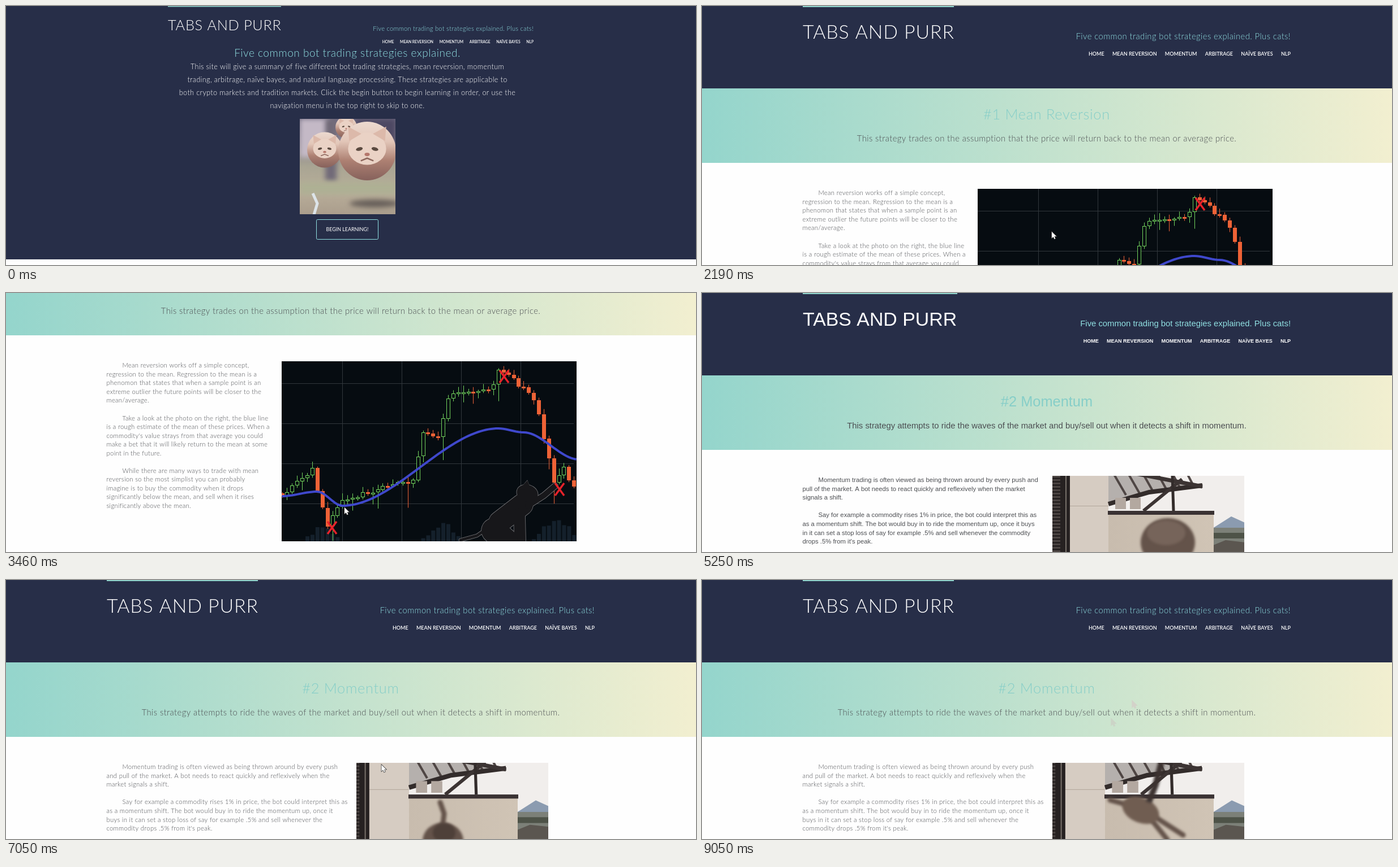
An HTML page with a canvas for the animation above (9.13 s loop, 1219x459 px).

```html
<!DOCTYPE html>
<html lang="en">
<head>
<meta charset="utf-8">
<title>Trading bot strategies</title>
<style>
html, body { margin: 0; width: 100%; height: 100%; overflow: hidden; background: #fff; }
canvas { display: block; }
</style>
</head>
<body>
<canvas id="stage" width="1219" height="459"></canvas>
<script>
const ctx = document.getElementById('stage').getContext('2d');
const W = 1219, H = 459, LOOP = 9130, TAU = Math.PI * 2;
const NAVY = '#272e48', TEAL = '#8fd4cc', AQUA = '#90e0e2', GREY = '#4c4e52';
const NAV = ['HOME', 'MEAN REVERSION', 'MOMENTUM', 'ARBITRAGE', 'NAÏVE BAYES', 'NLP'];
let fallback = false; // true until the web font has loaded

const INTRO = `This site will give a summary of five different bot trading strategies, mean reversion, momentum
trading, arbitrage, naïve bayes, and natural language processing. These strategies are applicable to
both crypto markets and tradition markets. Click the begin button to begin learning in order, or use the
navigation menu in the top right to skip to one.`;

// A leading ">" marks an indented first line.
const REVERSION = `>Mean reversion works off a simple concept,
regression to the mean. Regression to the mean is a
phenomon that states that when a sample point is an
extreme outlier the future points will be closer to the
mean/average.

>Take a look at the photo on the right, the blue line
is a rough estimate of the mean of these prices. When a
commodity's value strays from that average you could
make a bet that it will likely return to the mean at some
point in the future.

>While there are many ways to trade with mean
reversion so the most simplist you can probably
imagine is to buy the commodity when it drops
significantly below the mean, and sell when it rises
significantly above the mean.`;
const MOMENTUM = `>Momentum trading is often viewed as being thrown around by every push
and pull of the market. A bot needs to react quickly and reflexively when the
market signals a shift.

>Say for example a commodity rises 1% in price, the bot could interpret this as
as a momentum shift. The bot would buy in to ride the momentum up, once it
buys in it can set a stop loss of say for example .5% and sell whenever the
commodity drops .5% from it's peak.`;
const MOMENTUM_FALLBACK = `>Momentum trading is often viewed as being thrown around by every push and
pull of the market. A bot needs to react quickly and reflexively when the market
signals a shift.

>Say for example a commodity rises 1% in price, the bot could interpret this as
as a momentum shift. The bot would buy in to ride the momentum up, once it buys
in it can set a stop loss of say for example .5% and sell whenever the commodity
drops .5% from it's peak.`;

const mix = (a, b, p) => a + (b - a) * p;
const progress = (t, from, to) => Math.min(1, Math.max(0, (t - from) / (to - from)));
const smooth = p => p * p * (3 - 2 * p);
const random = n => Math.abs(Math.sin(n * 12.9898 + 4.1) * 43758.5453) % 1;

// Height at x of a curve through [x, y] points.
function along(points, x, ease = p => p) {
  const i = Math.max(1, points.findIndex(p => p[0] >= x));
  const [x0, y0] = points[i - 1], [x1, y1] = points[i];
  return mix(y0, y1, ease((x - x0) / (x1 - x0)));
}

function rect(x, y, w, h, color) {
  ctx.fillStyle = color;
  ctx.fillRect(x, y, w, h);
}
function ellipse(x, y, rx, ry, color, turn = 0) {
  ctx.fillStyle = color;
  ctx.beginPath();
  ctx.ellipse(x, y, rx, ry, turn, 0, TAU);
  ctx.fill();
}
function path(points) {
  ctx.beginPath();
  for (let i = 0; i < points.length; i += 2) ctx.lineTo(points[i], points[i + 1]);
}
function shape(points, color) {
  path(points);
  ctx.fillStyle = color;
  ctx.fill();
}
function line(points, color, width, cap = 'butt') {
  path(points);
  ctx.strokeStyle = color;
  ctx.lineWidth = width;
  ctx.lineCap = cap;
  ctx.stroke();
}
function gradient(x0, y0, x1, y1, ...colors) {
  const g = ctx.createLinearGradient(x0, y0, x1, y1);
  colors.forEach((c, i) => g.addColorStop(i / (colors.length - 1), c));
  return g;
}
function text(str, x, y, size, color, align = 'left', weight = 300) {
  const family = fallback ? '"Liberation Sans", Arial, sans-serif' : 'Lato, "Open Sans", sans-serif';
  ctx.font = `${fallback && weight < 600 ? 400 : weight} ${size}px ${family}`;
  ctx.letterSpacing = fallback || weight > 300 ? '0px' : size * 0.027 + 'px';
  ctx.textAlign = align;
  ctx.fillStyle = color;
  ctx.fillText(str, x, y);
}
// Clips to a box and moves the origin to its corner.
function framed(x, y, w, h, draw) {
  ctx.save();
  ctx.beginPath();
  ctx.rect(x, y, w, h);
  ctx.clip();
  ctx.translate(x, y);
  draw();
  ctx.restore();
}

function header(left, right, k) {
  rect(left, 0, (fallback ? 273 : 267) * k, 2 * k, TEAL);
  text('TABS AND PURR', left, 58 * k, 33.87 * k, '#fff');
  text('Five common trading bot strategies explained. Plus cats!', right, 59 * k, 14.84 * k, AQUA, 'right');
  let x = right;
  for (const item of [...NAV].reverse()) {
    text(item, x, 87.7 * k, 9.03 * k, '#fff', 'right', 600);
    x -= ctx.measureText(item).width + 14.2 * k;
  }
}

function ballCat(x, y, r) {
  ctx.save();
  ctx.translate(x, y);
  ctx.scale(r, r);
  ellipse(0, 0, 1, 1.02, gradient(0, -1, 0, 1, '#ecd9cf', '#e2c6b8', '#ad8072', '#87625c'));
  ellipse(0, -0.08, 0.66, 0.56, '#ead2c5');
  for (const side of [-1, 1]) {
    shape([side * 0.62, -0.35, side * 0.66, -0.85, side * 0.2, -0.6], '#dcb9aa');
    ellipse(side * 0.27, -0.07, 0.12, 0.06, '#5b4a40', side * 0.25);
  }
  ellipse(0, 0.12, 0.09, 0.06, '#b5776c');
  line([-0.22, 0.34, 0, 0.25, 0.22, 0.34], '#8d675d', 0.05);
  ctx.restore();
}

function catsPhoto() {
  rect(0, 0, 170, 170, gradient(0, 0, 0, 170, '#6f6a80', '#8d8692', '#a9a593', '#b9ae9a', '#aa9d8c'));
  ctx.filter = 'blur(4px)';
  rect(0, 0, 52, 68, '#c4b9c6');
  rect(45, 0, 20, 110, '#716a78');
  rect(98, 0, 72, 45, '#4d4863');
  rect(0, 112, 170, 22, '#aeb094');
  ellipse(132, 150, 44, 7, '#675f5a');
  ctx.filter = 'none';
  line([23, 132, 31, 150, 25, 170], '#dde4e8', 5);
  ballCat(82, 15, 19);
  ballCat(44, 55, 31);
  ballCat(119, 57, 51);
}

function homePage(t) {
  rect(0, 0, W, 449, NAVY);
  header(286, 932, 0.7486);
  text('Five common bot trading strategies explained.', 603, 90, 19.05, AQUA, 'center');
  INTRO.split('\n').forEach((s, i) => text(s, 603, 111.5 + 23.3 * i, 12.7, '#fff', 'center'));
  framed(519, 200, 169, 169, catsPhoto);
  ctx.beginPath();
  ctx.roundRect(548.5, 378.5, 109, 35, 2);
  ctx.fillStyle = `rgba(143,212,204,${0.15 * progress(t, 1150, 1350)})`;
  ctx.fill();
  ctx.strokeStyle = AQUA;
  ctx.lineWidth = 1;
  ctx.stroke();
  text('BEGIN LEARNING!', 603, 399, 8.9, '#fff', 'center', 400);
}

// Turning points as [candle, height].
const PRICE = [[0, 238], [6, 193], [9, 290], [12, 246], [26, 210], [28, 124], [31, 136], [33, 62],
  [42, 44], [43, 12], [49, 56], [51, 90], [54, 218], [56, 190], [58, 222]];
const MEAN = [[0, 239], [7, 231], [12, 256], [43, 119], [48, 126], [59, 174]];
const candleX = i => 0.6 + 8.89 * i;

function candle(i) {
  const x = Math.round(candleX(i)) + 0.5;
  const price = n => along(PRICE, Math.max(0, n)) + 10 * (random(n) - 0.5);
  const open = price(i - 1), close = price(i), rising = close < open;
  const top = Math.round(Math.min(open, close)), height = Math.max(3, Math.round(Math.abs(open - close)));
  const color = rising ? '#72d35d' : '#ee6236';
  line([x, top - 2 - 10 * random(i + 70), x, top + height + 3 + 40 * random(i + 140) ** 4], color, 1);
  rect(x - 3.5, top, 7, height, color);
  if (rising) rect(x - 2.5, top + 1, 5, height - 2, '#060c11');
}

// Cat reaching for the last cross: grown parts first give the pale outline.
function reachingCat() {
  for (const [grow, color] of [[0.8, '#77777a'], [0, '#17171a']]) {
    const limb = (points, width) => line(points, color, width + 2 * grow, 'round');
    limb([316, 317, 345, 309, 365, 295], 5);
    limb([385, 285, 425, 254], 38);
    limb([420, 270, 421, 318], 20);
    limb([375, 300, 395, 318], 44);
    limb([435, 256, 463, 238, 483, 221], 10);
    ellipse(434, 234, 19 + grow, 15 + grow, color, 0.3);
    shape([419, 228, 434, 211 - grow, 440, 226], color);
  }
}

function chart() {
  rect(0, 0, 521, 319, '#060c11');
  for (let i = 0; i < 4; i++) {
    rect(107 + 105 * i, 0, 1, 319, '#31373c');
    rect(0, 39 + 71 * i, 516, 1, '#31373c');
  }
  for (let i = 0; i < 59; i++) {
    const bump = (center, height) => height * Math.exp(-(((i - center) / 3) ** 2));
    const volume = bump(8, 28) + bump(32, 36) + bump(54.5, 54);
    if (volume > 5) rect(candleX(i) - 3, 319 - volume * (0.6 + 0.4 * random(i)), 7, 60, '#14202b');
    candle(i);
  }
  const mean = [];
  for (let i = 0; i < 59; i += 0.5) mean.push(candleX(i), along(MEAN, i, smooth));
  line(mean, '#3f48cc', 4);
  reachingCat();
  for (const [x, y] of [[89, 295], [393, 27], [491, 227]])
    for (const side of [-8, 8]) line([x - side, y - 11, x + side, y + 11], '#e8222a', 3.5);
}

function article(title, subtitle, body) {
  rect(0, 0, W, 146, NAVY);
  header(178, 1040, 1);
  rect(0, 146, W, 132, gradient(0, 0, W, 0, '#94d5cc', '#c3e2ce', '#f2efd0'));
  text(title, 609, 201, 25.4, '#86cec8', 'center');
  text(subtitle, 609, 240, 14.84, GREY, 'center');
  body.split('\n').forEach((s, i) =>
    text(s.replace('>', ''), s[0] === '>' ? 205.5 : 177.5, 335.2 + 15.55 * i, 11.29, GREY));
}

function reversionPage(t) {
  const scroll = 141 * progress(t, 2720, 3120) + 70.6 * (1 - (1 - progress(t, 3320, 3520)) ** 1.7);
  ctx.save();
  ctx.translate(0, -Math.round(scroll));
  article('#1 Mean Reversion',
    'This strategy trades on the assumption that the price will return back to the mean or average price.', REVERSION);
  framed(487, 324, 521, 319, chart);
  ctx.restore();
}

function patio(step) {
  rect(0, 0, 339, 135, '#f1eeec');
  // the camera slowly closes in
  const zoom = 1 + 0.032 * Math.min(1, step / 9);
  ctx.translate(286, 246);
  ctx.scale(zoom, zoom);
  ctx.translate(-286, -246);
  // hills, trees and roofs
  shape([280, 95, 316, 72, 360, 92, 360, 105, 280, 105], '#8b9bb0');
  rect(280, 92, 80, 60, '#7c8078');
  rect(280, 101, 60, 10, '#4e5348');
  shape([284, 123, 306, 114, 360, 120, 360, 150, 284, 150], '#5b5650');
  // walls and shutter
  rect(30, 0, 69, 150, '#d6ccc2');
  rect(30, 53, 69, 1, '#b2a69a');
  rect(99, 66, 186, 90, gradient(99, 0, 285, 0, '#c8bcae', '#d0c4b5'));
  rect(0, 0, 31, 150, '#262121');
  for (let y = 0; y < 150; y += 6) rect(0, y, 14, 3, '#4b4442');
  rect(23, 0, 2, 150, '#777069');
  // pergola over hanging laundry
  shape([99, 0, 150, 0, 265, 19, 171, 30, 99, 52], '#b5b0ad');
  for (let i = 0; i < 6; i++) line([108 + 26 * i, -4, 130 + 24 * i, 34 - 3 * i], '#4f4644', 4);
  line([99, 50, 171, 29, 265, 17], '#332c2b', 8);
  line([147, -4, 265, 19], '#3c3433', 7);
  line([161, 62, 229, 6], '#3c3433', 6);
  line([212, 0, 214, 62], '#332c2b', 5);
  for (const x of [120, 146]) rect(x - 9, 39, 19, 20, '#b3a8a0');
  rect(98, 62, 188, 7, '#3a3233');
}

function jumpingCat(step) {
  const fur = '#64534a';
  ctx.filter = 'blur(2px)';
  if (step < 6) { // back of the head
    ctx.translate(-4 * step, 3 * step);
    ellipse(204, 118, 48, 43, fur);
    ellipse(201, 101, 34, 22, '#76645a');
  } else if (step < 14) { // tail up, about to spring
    ctx.translate(0, 2 * (9 - step));
    line([148, 70, 155, 90, 152, 115], fur, 9, 'round');
    ellipse(153, 138, 36, 32, fur);
    ellipse(155, 124, 20, 17, '#4e4039');
  } else { // stretched leap
    ctx.translate(0, 3 * (19 - step));
    for (const [x, y] of [[231, 128], [203, 136], [102, 66]]) line([160, 82, x, y], fur, 9, 'round');
    ellipse(156, 84, 34, 22, '#705d51', 0.4);
    line([170, 70, 182, 40, 200, -30], '#3c3230', 11);
  }
  ctx.filter = 'none';
}

function momentumPage(t) {
  article('#2 Momentum',
    'This strategy attempts to ride the waves of the market and buy/sell out when it detects a shift in momentum.',
    fallback ? MOMENTUM_FALLBACK : MOMENTUM);
  const step = Math.floor((t - 5250) / 200);
  for (const draw of [patio, jumpingCat]) framed(619, 324, 339, 135, () => draw(step));
  // faint trail left by the pointer
  if (t > 7280) {
    arrow(723, 246, '#ccd4c7');
    arrow(760, 214, '#d3d2c9');
  }
}

function arrow(x, y, color, outline = color) {
  ctx.save();
  ctx.translate(x, y);
  path([0, 0, 0, 11.5, 2.7, 9, 4.6, 13, 6.4, 12.2, 4.6, 8.3, 8.2, 8.2]);
  ctx.closePath();
  ctx.strokeStyle = outline;
  ctx.lineWidth = 1.4;
  ctx.stroke();
  ctx.fillStyle = color;
  ctx.fill();
  ctx.restore();
}
function hand(x, y) {
  for (const [grow, color] of [[0.6, '#222'], [0, '#fff']]) {
    line([x + 5, y + 2, x + 5, y + 10], color, 2.5 + 2 * grow, 'round');
    ellipse(x + 7, y + 11, 5 + grow, 5 + grow, color);
  }
}

// Each move: start time, end time, x, y reached.
const VISITS = [
  { from: 190, to: 5250, start: [1060, 415], moves: [[190, 650, 731, 324], [790, 1390, 612, 391],
    [2130, 2190, 618, 400], [2190, 2460, 598, 380], [4260, 4460, 615, 440]] },
  { from: 6060, to: 7720, start: [640, 459], moves: [[6060, 7050, 663, 328], [7050, 7280, 760, 215],
    [7280, 7720, 1120, 462]] }];

function pointer(t) {
  const visit = VISITS.find(v => t >= v.from && t < v.to);
  if (!visit) return;
  const [x, y] = visit.moves.reduce(([x, y], [from, to, toX, toY]) => {
    const p = progress(t, from, to);
    return [mix(x, toX, p), mix(y, toY, p)];
  }, visit.start);
  if (t < 1580 && x < 658 && y > 379) hand(x, y);
  else arrow(x, y, '#fff', '#333');
}

function frame() {
  const t = performance.now() % LOOP;
  fallback = [1730, 5250].some(load => t >= load && t < load + 70);
  rect(0, 0, W, H, '#fefefe');
  (t < 1730 ? homePage : t < 5250 ? reversionPage : momentumPage)(t);
  pointer(t);
  requestAnimationFrame(frame);
}
frame();
</script>
</body>
</html>
```
